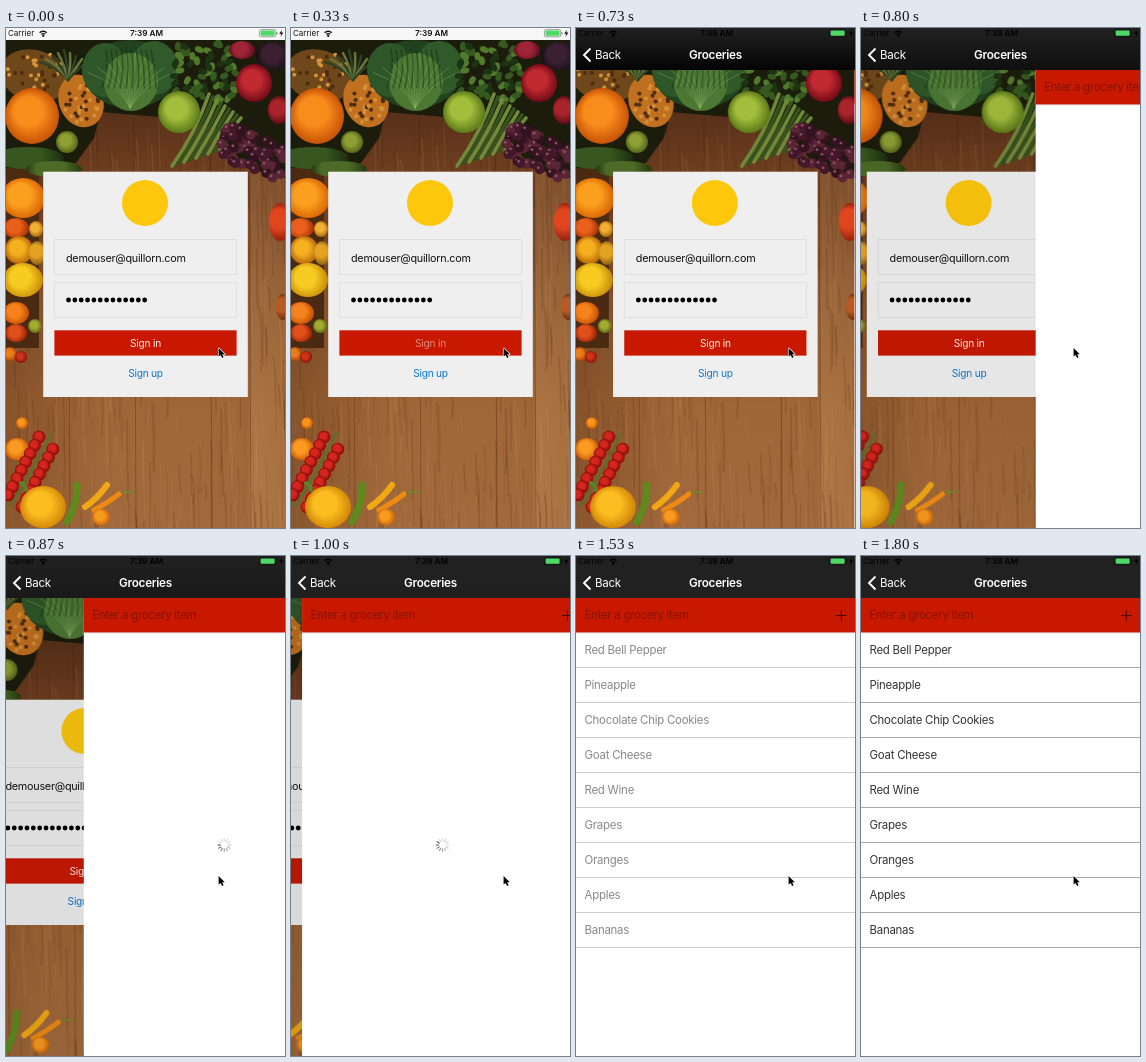
Recreate the animation shown at these times as an HTML page with a canvas. Size 279 px wide and 500 px high, loop 1870 ms.

```html
<!DOCTYPE html>
<html lang="en">
<head>
<meta charset="utf-8">
<title>Groceries</title>
<style>
html, body { margin: 0; width: 100%; height: 100%; overflow: hidden; background: #fff; }
canvas { display: block; width: 279px; height: 500px; }
</style>
</head>
<body>
<canvas id="stage"></canvas>
<script>
const W = 279, H = 500, LOOP = 1870, FPS = 15;
const PUSH_AT = 730, LIST_AT = 1200, LIST_FADE = 600;
const RED = '#c81800';
const ITEMS = ['Red Bell Pepper', 'Pineapple', 'Chocolate Chip Cookies', 'Goat Cheese',
  'Red Wine', 'Grapes', 'Oranges', 'Apples', 'Bananas'];

const canvas = document.getElementById('stage');
const dpr = window.devicePixelRatio || 1;
canvas.width = W * dpr;
canvas.height = H * dpr;
let ctx = canvas.getContext('2d');

const clamp = v => Math.max(0, Math.min(1, v));

function rect(x, y, w, h, color) {
  ctx.fillStyle = color;
  ctx.fillRect(x, y, w, h);
}

function oval(x, y, rx, ry, color, turn = 0) {
  ctx.fillStyle = color;
  ctx.beginPath();
  ctx.ellipse(x, y, rx, ry, turn, 0, Math.PI * 2);
  ctx.fill();
}

// Round fruit: shaded body with a soft highlight
function fruit(x, y, rx, ry, light, dark) {
  const r = Math.max(rx, ry);
  const g = ctx.createRadialGradient(x - rx * 0.25, y - ry * 0.3, r * 0.1, x, y, r);
  g.addColorStop(0, light);
  g.addColorStop(0.45, light);
  g.addColorStop(1, dark);
  oval(x, y, rx, ry, g);
}

function shape(points, color) {
  ctx.fillStyle = color;
  ctx.beginPath();
  points.forEach(([x, y]) => ctx.lineTo(x, y));
  ctx.closePath();
  ctx.fill();
}

function line(points, color, width) {
  ctx.strokeStyle = color;
  ctx.lineWidth = width;
  ctx.beginPath();
  points.forEach(([x, y]) => ctx.lineTo(x, y));
  ctx.stroke();
}

function curve(x0, y0, cx, cy, x1, y1, color, width) {
  ctx.strokeStyle = color;
  ctx.lineWidth = width;
  ctx.lineCap = 'round';
  ctx.beginPath();
  ctx.moveTo(x0, y0);
  ctx.quadraticCurveTo(cx, cy, x1, y1);
  ctx.stroke();
  ctx.lineCap = 'butt';
}

function text(str, x, y, size, color, align = 'left', weight = 400) {
  ctx.font = `${weight} ${size}px Inter, Roboto, sans-serif`;
  ctx.letterSpacing = size > 9 ? '-0.25px' : '0px';
  ctx.textAlign = align;
  ctx.textBaseline = 'alphabetic';
  ctx.fillStyle = color;
  ctx.fillText(str, x, y);
}

function seeded(seed) {
  return () => (seed = seed * 16807 % 2147483647) / 2147483647;
}

// Backdrop: a wooden table with produce around the edges
function paintTable() {
  const rnd = seeded(77);
  const wood = ctx.createLinearGradient(0, 12, 0, H);
  wood.addColorStop(0, '#3c1f10');
  wood.addColorStop(0.25, '#6b3c1f');
  wood.addColorStop(0.5, '#8a5730');
  wood.addColorStop(0.75, '#9f6637');
  wood.addColorStop(1, '#a26a3c');
  rect(0, 12, W, H - 12, wood);

  const side = ctx.createLinearGradient(0, 0, W, 0);
  side.addColorStop(0, 'rgba(60,25,5,.25)');
  side.addColorStop(0.35, 'rgba(60,25,5,0)');
  side.addColorStop(0.85, 'rgba(60,25,5,0)');
  side.addColorStop(0.88, 'rgba(225,170,110,.2)');
  side.addColorStop(1, 'rgba(225,170,110,.12)');
  rect(0, 12, W, H - 12, side);

  for (let i = 0; i < 420; i++) {
    const x = rnd() * W, y = 90 + rnd() * 410, len = 15 + rnd() * 55;
    curve(x, y, x + rnd() * 3, y + len / 2, x + rnd() * 2, y + len,
      i % 2 ? 'rgba(62,26,6,.15)' : 'rgba(225,165,105,.12)', 0.6 + rnd() * 1.4);
  }
  for (const x of [62, 128, 204, 243]) line([[x, 90], [x + 2, H]], 'rgba(50,20,5,.3)', 1);

  shape([[0, 12], [W, 12], [W, 150], [240, 140], [210, 100], [165, 90], [95, 84],
    [88, 110], [70, 135], [0, 160]], '#1c1c0d');
  rect(0, 140, 33, 180, '#4b2a12');
}

function paintTop() {
  const rnd = seeded(19);
  // pineapples
  oval(28, 48, 34, 26, '#6e481a', 0.3);
  oval(75, 73, 22, 27, '#c0701f', -0.4);
  for (let i = 0; i < 70; i++) {
    const a = rnd() * 6.28, r = Math.sqrt(rnd()), big = i % 2;
    const x = big ? 75 + Math.cos(a) * r * 19 : 30 + Math.cos(a) * r * 30;
    const y = big ? 73 + Math.sin(a) * r * 23 : 46 + Math.sin(a) * r * 22;
    oval(x, y, 2, 2, i % 4 < 2 ? '#d59238' : '#4f2b0e');
  }
  for (let i = 0; i < 9; i++) {
    curve(62, 52, 50 + i * 3, 38, 34 + i * 6, 22 + Math.abs(i - 4) * 3, i % 2 ? '#66763c' : '#2f4222', 2.5);
  }
  // cabbage
  oval(124, 46, 46, 34, '#21411f');
  oval(99, 42, 23, 27, '#2f5629');
  oval(148, 40, 24, 27, '#315a2a');
  oval(125, 54, 27, 29, '#4c7834');
  for (let i = 0; i < 10; i++) {
    curve(124, 80, 112 + i * 3, 55, 82 + i * 9.5, 22 + Math.abs(i - 4.5) * 5, 'rgba(150,180,105,.4)', 1);
    curve(100 + i * 5, 22, 104 + i * 5, 40, 96 + i * 6, 60, 'rgba(15,38,14,.45)', 1.5);
  }
  // greens and asparagus
  for (let i = 0; i < 70; i++) {
    oval(168 + rnd() * 62, 15 + rnd() * 58, 4.5, 3, ['#36591f', '#1d3413', '#527a2c'][i % 3], rnd() * 3);
  }
  for (let i = 0; i < 9; i++) {
    curve(166 + i * 6, 138 - i * 2, 190 + i * 4, 104, 203 + i * 4, 66 + i * 3,
      i % 2 ? '#35531d' : '#708a3a', 3.6);
  }
  fruit(173, 84, 21, 21, '#a3bd3c', '#5c7a18');
  // red produce and aubergine
  fruit(268, 28, 18, 14, '#3a2030', '#140c14');
  fruit(236, 22, 13, 9, '#a02438', '#5a0e20');
  fruit(248, 55, 18, 19, '#c02a30', '#700a16');
  fruit(273, 82, 11, 14, '#a8242a', '#5e0c14');
  for (let i = 0; i < 60; i++) {
    const x = 215 + rnd() * 66, y = 92 + rnd() * 38 + (x - 217) * 0.45;
    oval(x, y, 5, 5, ['#32131f', '#592433', '#43182a'][i % 3]);
    oval(x - 1.5, y - 1.5, 1.4, 1.4, '#8a5364');
  }
  // orange and cucumbers
  fruit(26, 88, 27, 28, '#f98d1c', '#c65205');
  fruit(22, 130, 36, 11, '#38561f', '#1a2e10');
  fruit(48, 141, 28, 8, '#4d6a26', '#24380f');
  fruit(61, 114, 11, 11, '#8f9f34', '#55681a');
}

function paintSide() {
  const basket = [
    [17, 170, 22, 20, '#fba01e', '#d96204'],
    [10, 200, 13, 10, '#e8601a', '#a53008'],
    [30, 201, 7, 8, '#f0b032', '#a86a10'],
    [13, 222, 14, 14, '#f5b020', '#b86a08'],
    [31, 225, 8, 12, '#e3a222', '#8f6210'],
    [17, 252, 20, 17, '#f6cb22', '#c68a08'],
    [10, 285, 13, 11, '#f5821a', '#c24c06'],
    [29, 298, 7, 7, '#a3ac30', '#65701a'],
    [10, 305, 11, 9, '#e0501a', '#9c2408'],
    [4, 326, 7, 7, '#ea7c1a', '#b04a08'],
    [15, 329, 6, 6, '#cc3418', '#861408'],
    [16, 395, 6, 6, '#fa941c', '#c85c08'],
    [11, 421, 12, 11, '#fb9a22', '#cc5c06'],
    [274, 194, 11, 19, '#e0461e', '#96200c'],
    [277, 279, 7, 13, '#b85a24', '#70300f']
  ];
  basket.forEach(b => fruit(...b));
  // cherry tomatoes on a vine
  curve(45, 405, 32, 435, 4, 478, '#55712a', 2);
  for (let i = 0; i < 16; i++) {
    const k = i / 15, side = i % 2 ? 8 : -8;
    const x = 41 - k * 33 + side, y = 413 + k * 62 + side * 0.5;
    fruit(x, y, 6.4, 6.4, '#d4261c', '#860a0a');
  }
  // peppers
  fruit(37, 479, 23, 21, '#fbbd20', '#d08506');
  curve(20, 462, 20, 457, 15, 455, '#5a8429', 4);
  curve(71, 457, 72, 475, 61, 494, '#5f8a1e', 7);
  curve(101, 457, 92, 470, 79, 479, '#f0a915', 6);
  curve(113, 466, 103, 474, 88, 482, '#ee8a14', 5);
  fruit(95, 489, 9, 8, '#f79a20', '#cc6408');
  curve(116, 465, 122, 463, 127, 464, '#75852b', 2);
}

function makeBackdrop() {
  const layer = document.createElement('canvas');
  layer.width = W * dpr;
  layer.height = H * dpr;
  const main = ctx;
  ctx = layer.getContext('2d');
  ctx.scale(dpr, dpr);
  ctx.beginPath();
  ctx.rect(0, 12, W, H - 12);
  ctx.clip();
  paintTable();
  paintTop();
  paintSide();
  ctx = main;
  return layer;
}

const backdrop = makeBackdrop();

function labelAlpha(t) {
  if (t < 130 || t >= 600) return 1;
  if (t < 270) return 0.3;
  return 0.3 + 0.7 * clamp((t - 230) / 330);
}

function field(y) {
  ctx.strokeStyle = '#dcdcdc';
  ctx.lineWidth = 0.8;
  ctx.strokeRect(48.4, y + 0.5, 182.2, 35);
}

function drawLogin(t) {
  rect(0, 0, W, 12, '#f7f7f7');
  ctx.drawImage(backdrop, 0, 0, W, H);
  rect(37.2, 143.7, 204.6, 225.3, '#efefef');
  oval(139, 175, 23, 23, '#fdc70c');
  field(211);
  field(254);
  text('demouser@quillorn.com', 60, 233.5, 10.8, '#111');
  for (let i = 0; i < 13; i++) oval(62.5 + i * 6.35, 272, 2.4, 2.4, '#000');
  rect(48.4, 302.3, 182.2, 25.3, RED);
  text('Sign in', 139.5, 319, 10.2, `rgba(255,240,235,${labelAlpha(t)})`, 'center');
  text('Sign up', 139.5, 349, 10.2, '#0a78d0', 'center');
}

function drawSpinner(t) {
  const head = Math.round((t - 1130) / 83.33);
  for (let i = 0; i < 12; i++) {
    const a = (head - i) * Math.PI / 6;
    const s = Math.sin(a), c = -Math.cos(a);
    line([[140.5 + s * 3.4, 289 + c * 3.4], [140.5 + s * 6.8, 289 + c * 6.8]],
      `rgba(70,70,70,${Math.max(0.22, 0.9 - i * 0.1)})`, 1.1);
  }
}

function drawList(t) {
  rect(0, 42, W, H - 42, '#fff');
  rect(0, 42, W, 34.5, RED);
  text('Enter a grocery item', 8.5, 63, 11.4, '#861300');
  line([[260, 59.5], [270.5, 59.5]], '#470a00', 1);
  line([[265.3, 54.2], [265.3, 64.7]], '#470a00', 1);
  if (t < LIST_AT) return drawSpinner(t);

  const k = clamp((t - LIST_AT) / LIST_FADE);
  ctx.globalAlpha = k * k * (3 - 2 * k);
  ITEMS.forEach((name, i) => {
    text(name, 8.5, 98 + i * 35, 11.45, '#333');
    rect(0, 111 + i * 35, W, 1, '#a9a9a9');
  });
  ctx.globalAlpha = 1;
}

function drawNav(p) {
  const low = Math.round(4 + 29 * p);
  const g = ctx.createLinearGradient(0, 0, 0, 42);
  g.addColorStop(0, '#212121');
  g.addColorStop(1, `rgb(${low},${low},${low})`);
  rect(0, 0, W, 42, g);
  line([[14.5, 20.5], [8, 27], [14.5, 33.5]], '#fff', 1.9);
  text('Back', 19, 31, 11.5, '#fff');
  text('Groceries', 139.5, 31, 11.7, '#fff', 'center', 600);
}

function drawStatus(dark) {
  const ink = dark ? '#000' : '#111';
  text('Carrier', 2, 8.3, 8, ink);
  text('7:39 AM', 140.5, 8.4, 8.2, ink, 'center', 600);
  ctx.strokeStyle = ink;
  ctx.lineWidth = 1.4;
  [2.6, 5].forEach(r => {
    ctx.beginPath();
    ctx.arc(37.2, 8.2, r, -2.36, -0.78);
    ctx.stroke();
  });
  oval(37.2, 7.9, 1.1, 1.1, ink);
  ctx.lineWidth = 0.7;
  ctx.strokeStyle = dark ? '#101010' : '#777';
  ctx.beginPath();
  ctx.roundRect(253.4, 1.6, 16.4, 7.2, 1.8);
  ctx.stroke();
  rect(270.4, 4, 1, 2.6, dark ? '#101010' : '#777');
  ctx.fillStyle = '#4cd964';
  ctx.beginPath();
  ctx.roundRect(254.6, 2.6, 14, 5.2, 1);
  ctx.fill();
  shape([[276, 1.8], [273.2, 5.8], [275.2, 5.8], [274.5, 9], [277.4, 4.6], [275.4, 4.6]], ink);
}

function drawCursor() {
  ctx.save();
  ctx.translate(212.6, 320);
  const arrow = [[0, 0], [0, 8.6], [2, 6.9], [3.5, 10], [5, 9.3], [3.6, 6.3], [6.2, 6.2]];
  ctx.lineJoin = 'round';
  line([...arrow, arrow[0]], '#fff', 1.3);
  shape(arrow, '#000');
  ctx.restore();
}

function draw(t) {
  const pushed = t >= PUSH_AT;
  const s = pushed ? (t - PUSH_AT) * 0.0186 : 0;
  const p = 1 - (1 + s) * Math.exp(-s);

  ctx.setTransform(dpr, 0, 0, dpr, 0, 0);
  rect(0, 0, W, H, '#fff');
  ctx.save();
  ctx.translate(-84 * p, 0);
  drawLogin(t);
  ctx.restore();
  if (p > 0) {
    rect(0, 0, W, H, `rgba(0,0,0,${0.1 * p})`);
    ctx.save();
    ctx.translate(W * (1 - p), 0);
    drawList(t);
    ctx.restore();
  }
  if (pushed) drawNav(p);
  drawStatus(pushed);
  drawCursor();
}

const start = performance.now();

function tick() {
  const t = (performance.now() - start) % LOOP;
  const step = Math.floor((t + 4) * FPS / 1000);
  draw(Math.min(step, 27) * 1000 / FPS);
  requestAnimationFrame(tick);
}
tick();
</script>
</body>
</html>
```
